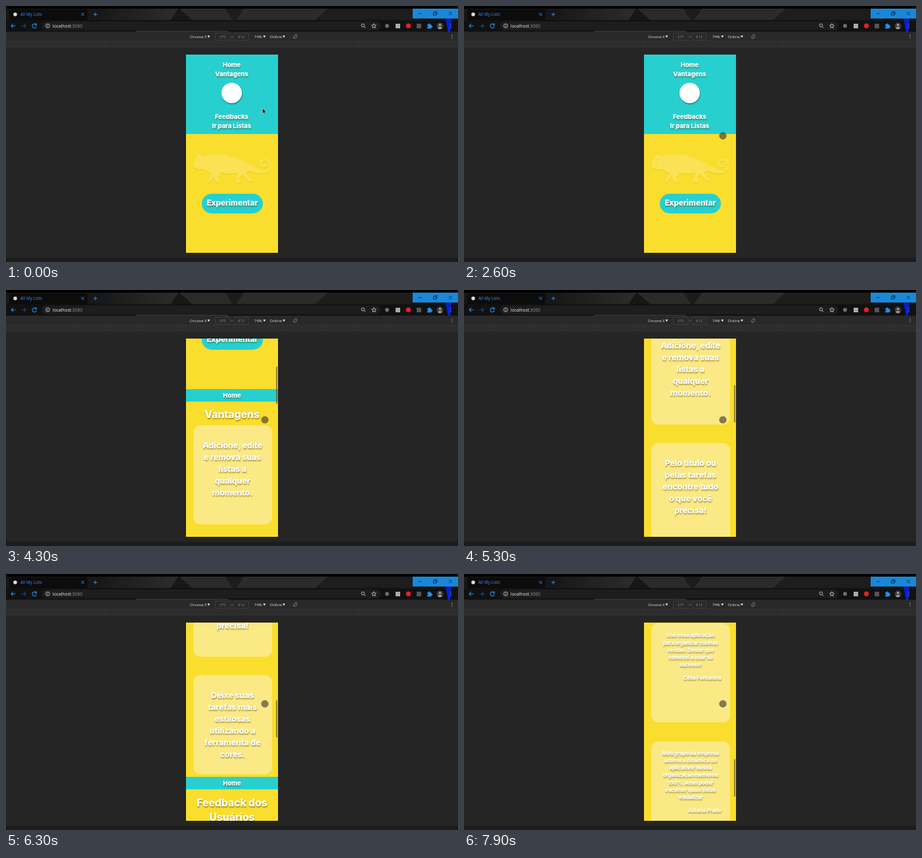
An HTML page that plays this animation: 688x390 px, repeating every 8 s.

```html
<!DOCTYPE html>
<html lang="pt">
<head>
<meta charset="utf-8">
<title>All My Lists</title>
<style>
  @property --s { syntax: '<integer>'; inherits: true; initial-value: 0; }

  html, body { margin: 0; width: 688px; height: 390px; overflow: hidden; background: #252525; }
  body { position: relative; }
  .browser { position: absolute; inset: 0; font: 6px 'Open Sans', sans-serif; }

  .device {
    position: absolute; left: 274px; top: 74px; width: 140px; height: 302px;
    overflow: hidden; background: #f9de2e;
    font: 800 9.6px/14px Inter, sans-serif; letter-spacing: -.01em; color: #fff; text-align: center;
    animation: scroll 8s infinite;
  }
  .page { position: absolute; left: 0; top: -1px; transform: translateY(calc(var(--s) * -1px)); }
  .page > * { position: absolute; margin: 0; left: 0; width: 140px; white-space: pre; }
  .page :is(p, h2, b) { font-weight: 800; text-shadow: .5px 1.5px 1.5px rgba(70, 60, 0, .45); }
  .teal { background: #27d0cf; }
  .nav { top: 0; height: 122px; }
  .nav b { position: absolute; left: 0; width: 139px; }
  .nav i {
    position: absolute; left: 54px; top: 44px; width: 31px; height: 31px; border-radius: 50%;
    background: #fff; box-shadow: .5px 1.5px 2px rgba(0, 60, 60, .5);
  }
  .page > .button {
    left: 24px; top: 213px; width: 93px; height: 30px; border-radius: 15px;
    font-size: 11.8px; line-height: 29px;
  }
  .bar { height: 19px; line-height: 20px; }
  .page h2 { font-size: 15.8px; line-height: 22.5px; }
  .page .card {
    left: 11px; width: 119.5px; height: 150.5px; border-radius: 11px; box-sizing: border-box;
    padding-top: 22px; background: #fbe985; font-size: 12.4px; line-height: 18px;
  }
  .page .quote { padding-top: 13.4px; font-size: 7.8px; line-height: 11.15px; }
  .quote b { display: block; margin: 9px 13px 0 0; text-align: right; }
  .thumb {
    position: absolute; left: 137px; top: 1px; width: 1.6px; height: 57px; border-radius: 1px;
    background: rgba(90, 80, 30, .65); opacity: var(--s);
    transform: translateY(calc(var(--s) * .185px));
  }

  @keyframes scroll {
    0%     { --s: 0; animation-timing-function: step-end; }
    33.75% { --s: 0; animation-timing-function: steps(16); }
    53.75% { --s: 225; animation-timing-function: steps(10); }
    66.25% { --s: 377; animation-timing-function: steps(10); }
    78.75% { --s: 634; animation-timing-function: steps(6); }
    86.25% { --s: 892; animation-timing-function: steps(10); }
    98.75%, 100% { --s: 1119; }
  }

  .arrow { animation: arrow 8s step-end infinite; }
  .touch { animation: touch 8s step-end infinite; }
  @keyframes arrow { 0% { opacity: 1; } 12.5%, 100% { opacity: 0; } }
  @keyframes touch {
    0% { opacity: 0; transform: translateY(-36px); }
    12.5% { opacity: 1; transform: translateY(-28px); }
    13.75% { opacity: 1; transform: translateY(-12px); }
    15%, 100% { opacity: 1; transform: none; }
  }
</style>
</head>
<body>

<svg class="browser" width="688" height="390" viewBox="0 0 688 390">
  <defs>
    <linearGradient id="shard"><stop stop-color="#181818"/><stop offset="1" stop-color="#2c2c2c"/></linearGradient>
    <linearGradient id="glow" x2="0" y2="1"><stop stop-color="#0a20b8"/><stop offset="1" stop-color="#0a1cff"/></linearGradient>
  </defs>

  <!-- tab strip -->
  <path fill="#000" d="M0 0H688V4H0z"/>
  <path fill="#171717" d="M0 4H688V39H0z"/>
  <path fill="url(#shard)" d="M150 4H262L250 22H140z"/>
  <path fill="#2a2a2a" d="M264 4H334L346 22H284z"/>
  <path fill="#1c1c1c" d="M334 4H362L350 22H346z"/>
  <path fill="#2b2b2b" d="M362 4H490L470 22H350z"/>
  <path fill="#1d1d1d" d="M490 4H619V22H470z"/>
  <path fill="#0c0c0c" d="M5 22V8q0-3 3-3H121q3 0 3 3V22z"/>
  <circle cx="14" cy="12.8" r="2.8" fill="#ddd"/>
  <text x="22" y="15.2" font-size="6.4" fill="#3a8cff">All My Lists</text>
  <path stroke="#2b8df0" fill="none" d="M114.500 10.500l4.400 4.400m0-4.400l-4.400 4.400M133 12.800h6m-3-3v6"/>
  <path fill="#1b87d8" d="M619 4H688V19H619z"/>
  <path stroke="#062c50" stroke-width=".9" fill="none" d="M628 11.500h4.500M650.500 10h4v4h-4zM652 10V8.700h4V12.500h-1.500M674 9l4.800 4.800m0-4.800L674 13.800"/>

  <!-- toolbar -->
  <path fill="#111" d="M0 21.500H688V39H0z"/>
  <path fill="url(#glow)" d="M669 19H678L676 39H673z"/>
  <path stroke="#555" stroke-width=".8" d="M198 38.300H338"/>
  <rect x="55" y="23.500" width="515" height="13.500" rx="6.700" fill="#1d1d1f"/>
  <g fill="none" stroke="#2391f0" stroke-width="1.100">
    <path d="M14.500 30.200H8m3-3l-3 3 3 3"/>
    <path stroke="#174a78" d="M23.500 30.200H30m-3-3l3 3-3 3"/>
    <path d="M45.600 28.200a3.200 3.200 0 1 0 .7 3.100M46.300 26.600v2.600h-2.600"/>
  </g>
  <g fill="none" stroke="#ddd" stroke-width=".8">
    <circle cx="63.500" cy="30.200" r="3"/>
    <path d="M63.500 29.700v2.200m0-3.600v.7"/>
    <circle cx="543.300" cy="29.500" r="2.300"/>
    <path d="M545 31.200l2.300 2.300"/>
    <path d="M560 26.800l1 2.300 2.500.2-1.900 1.700.6 2.400-2.200-1.300-2.200 1.300.6-2.400-1.900-1.700 2.500-.2z"/>
  </g>
  <text x="71" y="32.700" font-size="6.700" fill="#f2f2f2">localhost<tspan fill="#999">:3000</tspan></text>
  <circle cx="580" cy="30.300" r="3" fill="#66736c"/>
  <rect x="593" y="27" width="7" height="7" fill="#aaa"/>
  <circle cx="612.500" cy="30.200" r="3.700" fill="#e0202c"/>
  <rect x="625" y="27" width="7" height="7" fill="#555"/>
  <path fill="#2391f0" d="M641 28.200h2a1.300 1.300 0 1 1 2.500 0h2v2a1.300 1.300 0 1 1 0 2.500v1.500h-6.500v-2a1.200 1.200 0 1 0 0-2.300z"/>
  <circle cx="660.500" cy="30.300" r="5" fill="#3c3c3c"/>
  <path fill="#999" d="M657 34a3.600 3 0 0 1 7 0 5 5 0 0 1-7 0zM658.700 28.800a1.900 1.900 0 1 1 3.800 0 1.900 1.900 0 1 1-3.800 0"/>
  <g fill="#2391f0"><circle cx="677" cy="27.500" r=".8"/><circle cx="677" cy="30.200" r=".8"/><circle cx="677" cy="32.900" r=".8"/></g>

  <!-- device bar -->
  <path fill="#292929" d="M0 39.500H688V53H0z"/>
  <path fill="#2d2d2d" d="M0 53H688V62.500H0z"/>
  <path stroke="#383838" stroke-width=".7" d="M0 53.300H688M0 62.500H688M40 54v8M105 54v8M150 54v8M202 54v8M266 54v8M274 54v8M414 54v8M422 54v8M486 54v8M538 54v8M583 54v8M648 54v8"/>
  <path fill="none" stroke="#454545" stroke-width=".7" d="M318.500 41.500h22.500v10.500h-22.500zM347 41.500h22v10.500h-22z"/>
  <g fill="#ddd">
    <text x="280" y="48.800">Orvane X</text>
    <text x="378" y="48.800">74%</text>
    <text x="401.500" y="48.800">Online</text>
    <path d="M306.500 45h4l-2 3.500zM391.300 45h4l-2 3.500zM421 45h4l-2 3.500z"/>
  </g>
  <g fill="#858585">
    <text x="324.500" y="48.800">375</text>
    <text x="342.300" y="48.800">×</text>
    <text x="353" y="48.800">812</text>
  </g>
  <path fill="none" stroke="#999" stroke-width=".7" d="M438 46.300l2-2 2.800 2.800-2 2zM437 47.300a3.300 3.300 0 0 0 3 2.500M443.200 45.500a3.300 3.300 0 0 0-3-2.500"/>
  <g fill="#ccc"><circle cx="679" cy="44.200" r=".6"/><circle cx="679" cy="46.500" r=".6"/><circle cx="679" cy="48.800" r=".6"/></g>
  <path fill="#1c1c1c" d="M0 383.500H688V390H0z"/>
</svg>

<div class="device">
  <div class="page">
    <div class="nav teal"><b style="top:9.500px">Home</b><b style="top:24px">Vantagens</b><i></i><b style="top:88.500px">Feedbacks</b><b style="top:103px">Ir para Listas</b></div>
    <svg style="top:145px" width="140" height="60" viewBox="274 218 140 60">
      <g fill="#fae254" style="filter:drop-shadow(.5px 1px .5px rgba(200,165,0,.35))">
        <path d="M285 244L287 236 290 229 295 225.500 300 229 307 227C320 225 334 225 345 230 358 234 368 240 379 246Q386 250 391 251L391 254.500Q380 256 371 251L366 254 369 260 375 266 371 268 364 261 360 257 355 262 357 268 351 269.500 350 265 352 254Q341 257 328 254L323 261 326 268 322 270 318 264 316 260 312 266 308 269.500 307 266 313 255Q306 253 302 249L294 249 287 247z"/>
        <path fill="none" stroke="#fae254" stroke-width="3" stroke-linecap="round" d="M386 252C396 257 403 249 402 241 400 232 388 232 388 240 388 246 396 246 396 241"/>
      </g>
      <circle cx="294" cy="235" r="1.300" fill="#f5d935"/>
      <path fill="none" stroke="#f8de45" stroke-width=".7" d="M286 244q6 0 11-2M302 230q4 9 0 17"/>
    </svg>
    <b class="button teal">Experimentar</b>

    <b class="bar teal" style="top:303px">Home</b>
    <h2 style="top:331px">Vantagens</h2>
    <p class="card" style="top:358px">Adicione, edite
e remova suas
listas a
qualquer
momento.</p>
    <p class="card" style="top:536.500px">Pelo título ou
pelas tarefas
encontre tudo
o que você
precisa!</p>
    <p class="card" style="top:715px">Deixe suas
tarefas mais
estilosas
utilizando a
ferramenta de
cores.</p>

    <b class="bar teal" style="top:870px">Home</b>
    <h2 style="top:898.500px">Feedback dos
Usuários</h2>
    <p class="card quote" style="top:942px">Comecei a utilizar o
Zelu para agilizar
minha organização na
faculdade e até agora
não tenho o que
reclamar. As listas
serem organizadas por
cores é a parte mais
legal! Recomendo
demais!<b>Renato Valerio</b></p>
    <p class="card quote" style="top:1121px">Uso essa aplicação
para organizar minhas
vendas. Desde que
comecei a usar só
sucesso!<b>Celia Fontanela</b></p>
    <p class="card quote" style="top:1300.500px">Meu grupo da empresa
adorou a dinâmica do
aplicativo! Nossa
organização melhorou
100%. Amei poder
escolher quais listas
visualizar<b>Juliana Prado</b></p>
  </div>
  <div class="thumb"></div>
</div>

<svg class="browser" width="688" height="390" viewBox="0 0 688 390">
  <path class="arrow" fill="#000" stroke="#eee" stroke-width=".5" d="M390.500 156v7.800l1.800-1.600 1.300 2.900 1.300-.6-1.300-2.800h2.500z"/>
  <circle class="touch" cx="394" cy="197.700" r="5.300" fill="rgba(50,50,50,.6)" stroke="rgba(50,45,20,.35)" stroke-width=".8"/>
</svg>

</body>
</html>
```
